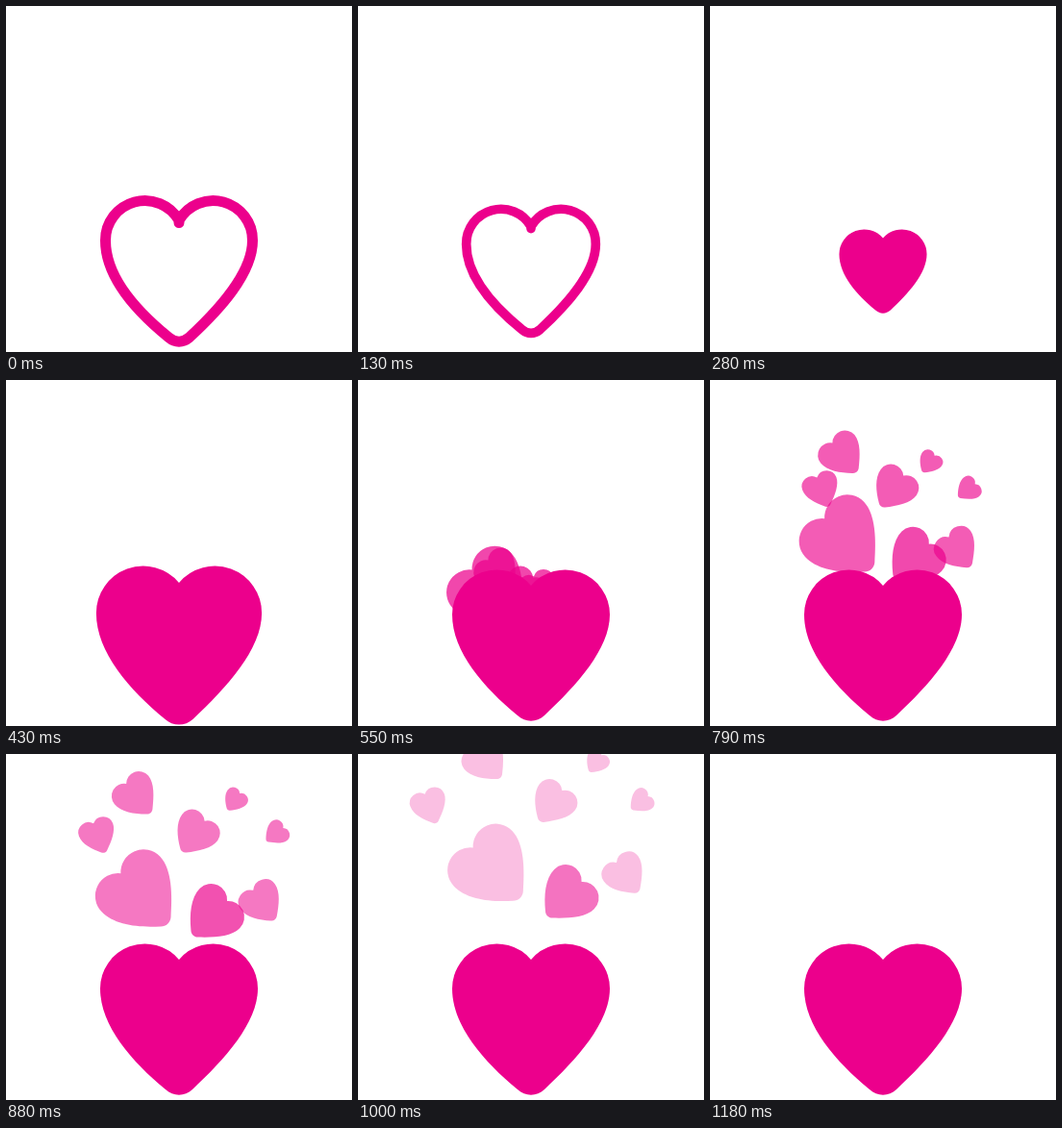
These frames come from a looping animation (360x360 px, 3310 ms). An HTML page:

```html
<!DOCTYPE html>
<html lang="en">
<head>
<meta charset="utf-8">
<title>Heart burst</title>
<style>
  html, body { margin: 0; width: 100%; height: 100%; overflow: hidden; background: #fff; }
  svg { display: block; width: 100%; height: 100%; }
</style>
</head>
<body>
<svg viewBox="0 0 360 360" fill="#ec008c">
  <defs>
    <path id="heart" d="M0-62A46.5 46.5 0 0 0-82-32C-82 7-49 44-14 73C-6 80.5 6 80.5 14 73C47 42 82 4 82-32A46.5 46.5 0 0 0 0-62Z"/>
  </defs>
  <g id="burst"></g>
  <g id="main">
    <use id="solid" href="#heart"/>
    <path id="outline" fill="none" stroke="#ec008c" stroke-width="11" stroke-linejoin="round"
      d="M0-50.5V-53A41 41 0 0 0-76.5-32C-76.5 5-45 41-10.5 69C-4 74.5 4 74.5 10.5 69C43 39 76.5 2 76.5-32A41 41 0 0 0 0-53Z"/>
  </g>
</svg>
<script>
const LOOP = 3310, HOLD = 100, STEP = 30, END = 1180;
const SWAP = 250, POP = 430, SETTLE = 550;
const FLIGHT = 850;

// Launch point, sideways drift, rise, tilt and size; drag 1 keeps a steady speed.
const particles = [
  { x: 140, y: 234, drift: 2, rise: 189, tilt: -43, size: .51, drag: 1 },
  { x: 149, y: 238, drift: -18, rise: 274, tilt: -40, size: .28 },
  { x: 210, y: 249, drift: -161, rise: 231, tilt: -21, size: .23 },
  { x: 166, y: 252, drift: 43, rise: 238, tilt: 36, size: .28 },
  { x: 184, y: 260, drift: 76, rise: 299, tilt: 36, size: .15 },
  { x: 210, y: 259, drift: 100, rise: 249, tilt: 52, size: .155 },
  { x: 229, y: 249, drift: 83, rise: 204, tilt: -36, size: .27, drag: 1 },
  { x: 209, y: 211, drift: 13, rise: 102, tilt: 45, size: .357, start: 680, end: 1170 }
];

const byId = id => document.getElementById(id);
const show = (node, on) => node.setAttribute("visibility", on ? "visible" : "hidden");

for (const p of particles) {
  p.node = document.createElementNS("http://www.w3.org/2000/svg", "use");
  p.node.setAttribute("href", "#heart");
  byId("burst").append(p.node);
}

function ease(t, t0, t1, from, to) {
  const u = Math.min(1, Math.max(0, (t - t0) / (t1 - t0)));
  return from + (to - from) * (1 - Math.cos(Math.PI * u)) / 2;
}

function mainScale(t) {
  if (t < SWAP) return ease(t, 70, SWAP, 1, .52);
  if (t < POP) return ease(t, SWAP, POP, .52, 1.05);
  return ease(t, POP, SETTLE, 1.05, 1);
}

function drawParticle(p, t) {
  const { start = 490, end = 1070, drag = 2 } = p;
  const age = (t - start) / (end - start);
  const visible = age >= 0 && age < 1;
  show(p.node, visible);
  if (!visible) return;
  const travel = 1 - (1 - (t - start) / FLIGHT) ** drag;
  const x = p.x + p.drift * travel, y = p.y - p.rise * travel;
  p.node.setAttribute("transform", `translate(${x} ${y}) rotate(${p.tilt}) scale(${p.size})`);
  p.node.setAttribute("opacity", .72 * (1 - age ** 3.35));
}

function render(ms) {
  const time = ms % LOOP;
  const t = time < HOLD ? 0 : Math.min(END, HOLD + STEP * Math.floor((time - HOLD) / STEP));
  byId("main").setAttribute("transform", `translate(180 276) scale(${mainScale(t)})`);
  show(byId("solid"), t >= SWAP);
  show(byId("outline"), t < SWAP);
  particles.forEach(p => drawParticle(p, t));
}

const began = performance.now();
function tick() {
  render(performance.now() - began);
  requestAnimationFrame(tick);
}
tick();
</script>
</body>
</html>
```
